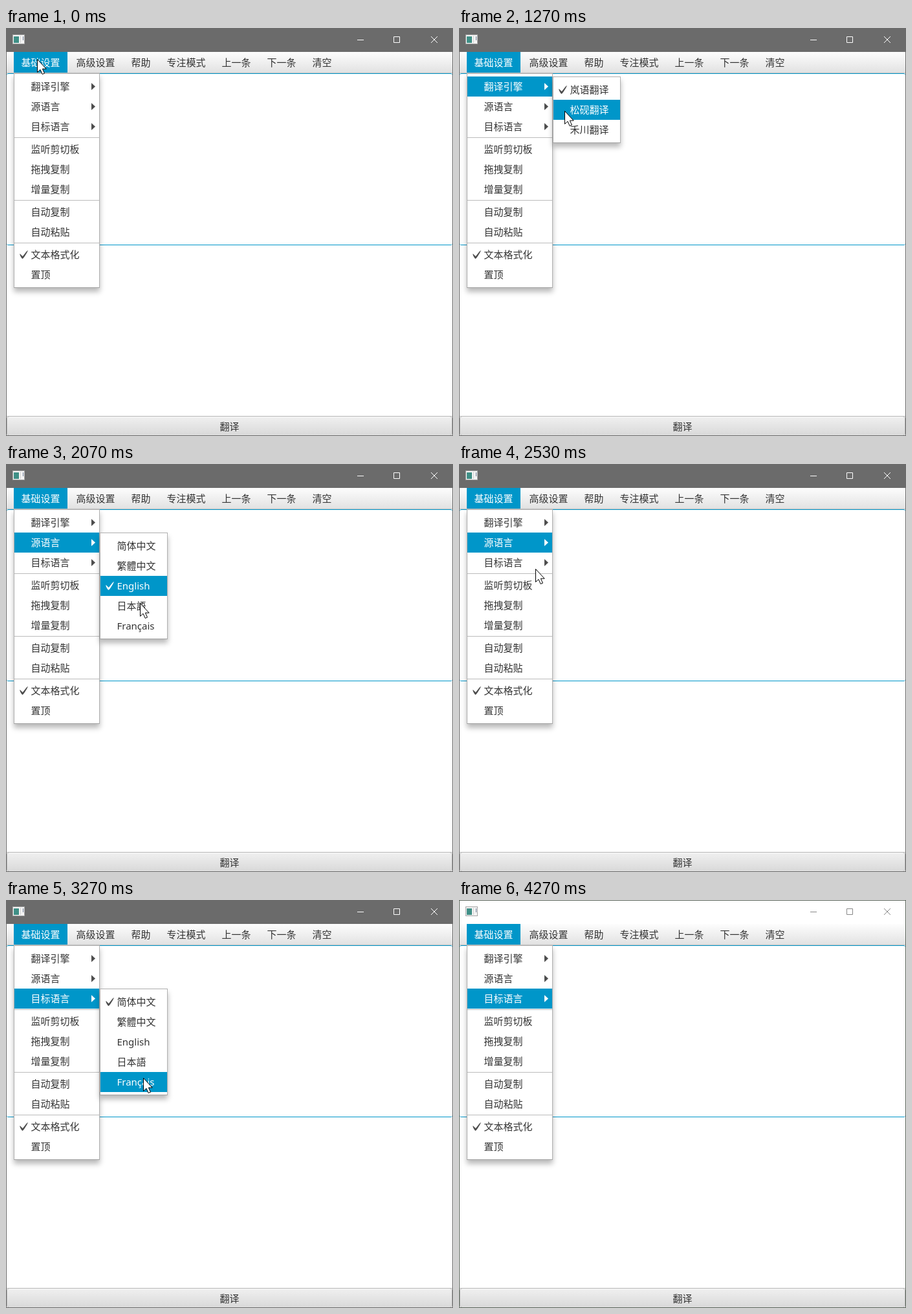
An HTML page for the animation above (4340 ms loop, 691 by 631 pixels).

```html
<!DOCTYPE html>
<html lang="zh-CN">
<head>
<meta charset="utf-8">
<title>设置菜单</title>
<style>
  * { box-sizing: border-box; }
  html, body { margin: 0; width: 100%; height: 100%; overflow: hidden; background: #fff; }
  body {
    position: relative; color: #333; --accent: #0096c9;
    font: 15px/31px "Noto Sans", "Noto Sans CJK SC", "Noto Sans CJK", sans-serif;
    white-space: nowrap; cursor: default;
  }
  body > *, .bar > *, .row > * { position: absolute; }
  svg { display: block; overflow: visible; }

  .title { left: 0; top: 0; width: 691px; height: 37px; background: #6b6b6b; color: #fff; }
  .frame { inset: 0 auto auto 0; width: 691px; height: 631px; border: 1px solid #6b6b6b; pointer-events: none; }
  .inactive .title { background: #fff; color: #888; }
  .inactive .frame { border-color: #5c665c; }

  .bar {
    left: 1px; top: 37px; width: 689px; height: 33px;
    background: linear-gradient(#fdfdfd, #e2e2e2); border-bottom: 1px solid #c4c4c4;
  }
  .bar .active { left: 11px; top: 0; width: 83px; height: 32px; background: var(--accent); }
  .bar .items { left: 10px; top: 1px; display: flex; }
  .bar .items span { padding: 0 12.5px; }
  .bar .items span:first-child { color: #fff; }

  .field { left: 1px; width: 689px; background: #fff; }
  .source { top: 69.5px; height: 266px; border: solid var(--accent); border-width: 1.5px 0; border-radius: 3px; }
  .result { top: 336px; height: 265px; border-bottom: 1px solid #c8c8c8; }
  .button {
    left: 1px; top: 600px; width: 689px; height: 31px; text-align: center;
    background: linear-gradient(#f0f0f0, #d9d9d9); border: 1px solid #b4b4b4;
    border-radius: 4px; box-shadow: inset 0 1px #fafafa; line-height: 30px;
  }

  .menu {
    padding: 4px 0; background: #fff; border: 1px solid #b0b0b0; border-bottom-color: #a0a0a0;
    box-shadow: 0 6px 8px rgba(0, 0, 0, .28);
  }
  .main { left: 12px; top: 70px; width: 133px; }
  .sub { left: 145px; width: 105px; display: none; }
  .sub.open { display: block; }
  .row { position: relative; height: 31px; }
  .row span { left: 25.5px; top: 0; }
  .row svg { fill: #4d4d4d; }
  .row .check { left: 8px; top: 9px; }
  .row .more { left: 119px; top: 10px; }
  .row.hot { background: var(--accent); color: #fff; }
  .row.hot svg { fill: #fff; }
  .sep { height: 4px; padding-top: 1px; }
  .sep::before { content: ""; display: block; height: 1px; background: #bcbcbc; }
  #pointer { left: 0; top: 0; }
</style>
</head>
<body>
<div class="title">
  <svg width="691" height="37" fill="none" stroke="currentColor">
    <rect x="10.5" y="10.5" width="18" height="14" fill="#f4f4f4" stroke="#a5a5a5"/>
    <rect x="12" y="13" width="8" height="10" fill="#3f8f86" stroke="none"/>
    <path d="M22.5 12V23" stroke="#d0d0d0"/>
    <path d="M26.5 13V19" stroke="#6d7d96"/>
    <path d="M543 18.5H553M599.5 13.5H608.5V22.5H599.5ZM657 13L667 23M667 13L657 23"/>
  </svg>
</div>
<div class="bar">
  <div class="active"></div>
  <div class="items">
    <span>基础设置</span><span>高级设置</span><span>帮助</span><span>专注模式</span><span>上一条</span><span>下一条</span><span>清空</span>
  </div>
</div>
<div class="field result"></div>
<div class="field source"></div>
<div class="button">翻译</div>
<div class="frame"></div>

<svg id="pointer" width="1" height="1">
  <path id="arrow" d="M.5 .5V20.5L5 16.4L8.2 23.5L11.5 22.1L8.4 15.2H14.2Z" fill="#fff" stroke="#000"/>
  <path id="beam" d="M-4 -9H-1L0 -8L1 -9H4M0 -8V9M-4 10H-1L0 9L1 10H4" fill="none" stroke="#000" stroke-width="1.7"/>
</svg>

<script>
const LOOP = 4340, ROW = 31;
const pointer = document.getElementById('pointer');
const arrow = document.getElementById('arrow');
const beam = document.getElementById('beam');

const icons = {
  '*': `<svg class="check" width="13" height="13" viewBox="-.5 -1 16.6 17.2"><path d="M-.25 6.08c.84-.76 4.58 4.83 5.75 4.83S14.5-1.5 15.92-.92c1.29.53-8.75 17.08-10.5 17.08C3 16.17-1.09 6.84-.25 6.08z"/></svg>`,
  '>': `<svg class="more" width="6" height="11"><path d="M0 0L6 5.5L0 11Z"/></svg>`
};

// A leading "*" marks a checked row, ">" a row with a submenu, "-" a separator.
function makeMenu(cls, labels) {
  const el = document.createElement('div');
  el.className = 'menu ' + cls;
  el.innerHTML = labels.split(' ').map(s => s === '-' ? '<div class="sep"></div>' :
    `<div class="row">${icons[s[0]] || ''}<span>${s.replace(/^[*>]/, '')}</span></div>`).join('');
  document.body.insertBefore(el, pointer);
  return { el, rows: [...el.querySelectorAll('.row')] };
}

const main = makeMenu('main',
  '>翻译引擎 >源语言 >目标语言 - 监听剪切板 拖拽复制 增量复制 - 自动复制 自动粘贴 - *文本格式化 置顶');

const subs = [
  { from: 3, to: 21, labels: '*岚语翻译 松砚翻译 禾川翻译' },
  { from: 22, to: 38, labels: '简体中文 繁體中文 *English 日本語 Français' },
  { from: 39, to: 64, labels: '*简体中文 繁體中文 English 日本語 Français' }
].map((s, i) => {
  const top = 75 + i * ROW;
  const menu = makeMenu('sub', s.labels);
  menu.el.style.top = top + 'px';
  return { ...s, ...menu, firstRow: top + 5 };
});

// Pointer path: tick, x, y
const path = [
  [0, 48, 48], [1, 51, 54], [3, 63, 76], [5, 63, 76], [9, 150, 92], [12, 217, 116],
  [13, 213, 136], [14, 214, 137], [16, 214, 137], [17, 210, 136], [20, 140, 124],
  [22, 103, 122], [23, 103, 122], [24, 109, 124], [25, 115, 124], [28, 185, 140],
  [30, 207, 185], [31, 207, 215], [32, 205, 225], [33, 200, 222], [36, 145, 180],
  [38, 118, 162], [39, 113, 152], [40, 112, 150], [41, 112, 150], [42, 118, 150],
  [44, 180, 157], [46, 208, 177], [48, 212, 268], [49, 212, 275], [50, 212, 277],
  [53, 212, 277], [54, 208, 300], [57, 155, 501], [59, 100, 575], [61, 60, 609]
];

function pointerAt(k) {
  const i = path.findIndex(p => p[0] >= k);
  if (i < 0) return null;
  const b = path[i], a = path[i - 1] || b;
  const f = a === b ? 0 : (k - a[0]) / (b[0] - a[0]);
  return [1, 2].map(n => Math.round(a[n] + (b[n] - a[n]) * f));
}

// The highlight trails the pointer by one tick and stays on the last row touched.
function hotRow(sub, k) {
  for (let j = k - 1; j >= sub.from; j--) {
    const p = pointerAt(j);
    if (!p || p[0] < 146 || p[0] > 249) continue;
    const row = Math.floor((p[1] - sub.firstRow) / ROW);
    if (row >= 0 && row < sub.rows.length) return row;
  }
  return 0;
}

function highlight(rows, hot) {
  rows.forEach((r, i) => r.classList.toggle('hot', i === hot));
}

function render(k) {
  highlight(main.rows, k < 2 ? -1 : k < 22 ? 0 : k < 39 ? 1 : 2);
  subs.forEach(s => {
    const open = k >= s.from && k < s.to;
    s.el.classList.toggle('open', open);
    if (open) highlight(s.rows, hotRow(s, k));
  });
  document.body.classList.toggle('inactive', k >= 64);

  const p = pointerAt(k);
  pointer.style.display = p ? '' : 'none';
  if (!p) return;
  const overText = k >= 54 && p[1] > 302 && p[1] < 601;
  arrow.style.display = overText ? 'none' : '';
  beam.style.display = overText ? '' : 'none';
  pointer.style.transform = `translate(${p[0]}px, ${p[1]}px)`;
}

// 15 ticks per second, each starting on a whole hundredth of a second.
function tickAt(t) {
  const k = Math.min(64, Math.floor((t + 4) * 0.015));
  return Math.round(k * 20 / 3) * 10 > t ? k - 1 : k;
}

const start = performance.now();
let shown = -1;
function loop() {
  const k = tickAt((performance.now() - start) % LOOP);
  if (k !== shown) render(shown = k);
  requestAnimationFrame(loop);
}
loop();
</script>
</body>
</html>
```
